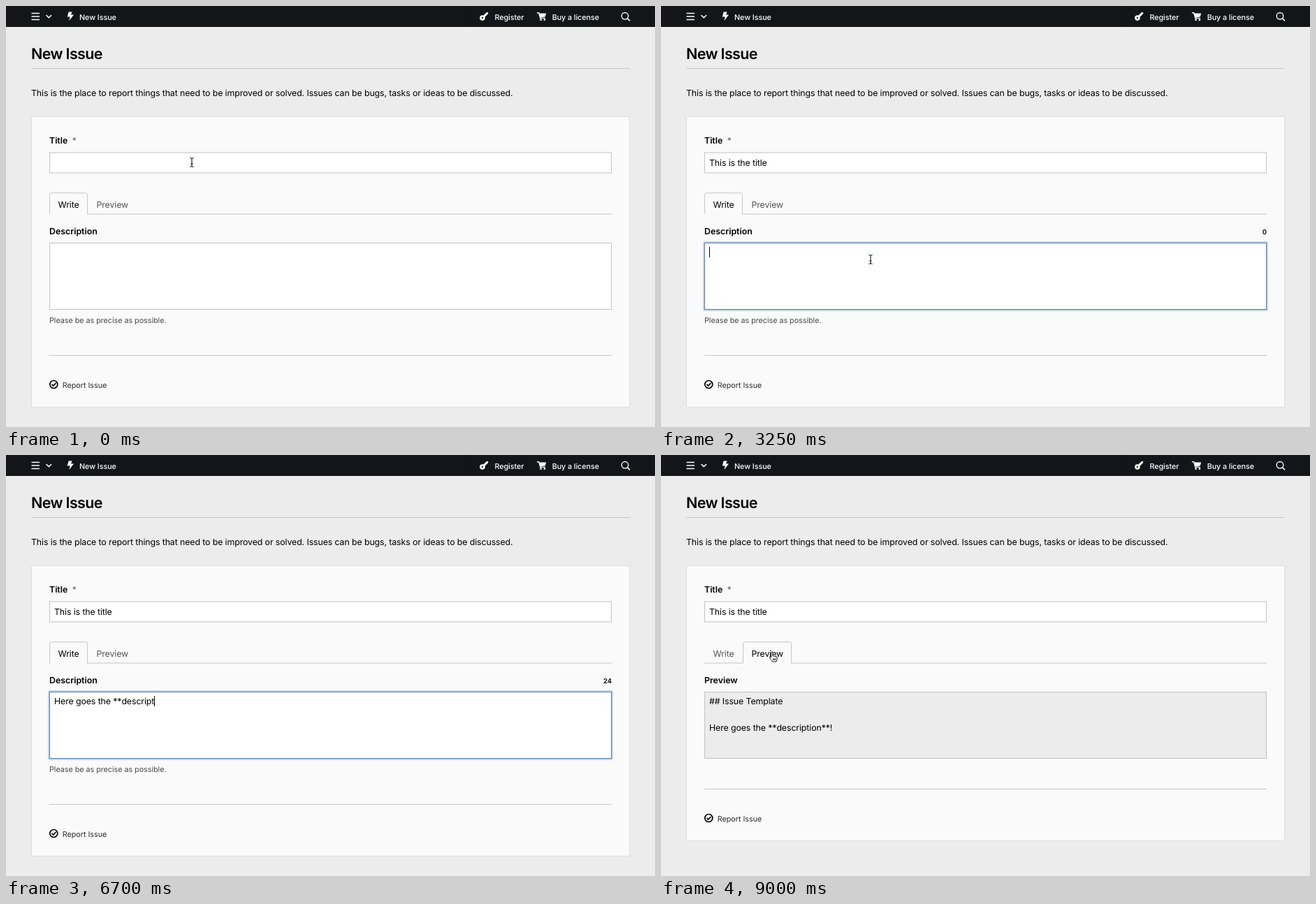
These frames come from a looping animation (929 px wide and 603 px high, 9.9 s). An HTML page:

```html
<!DOCTYPE html>
<html lang="en">
<head>
<meta charset="utf-8">
<title>New Issue</title>
<style>
html, body { margin: 0; width: 100%; height: 100%; overflow: hidden; background: #ececec; }
svg { display: block; width: 929px; height: 603px; }
text {
  font: 400 12.4px Inter, "Liberation Sans", sans-serif;
  letter-spacing: -.01em;
  white-space: pre;
  text-rendering: geometricPrecision;
  font-feature-settings: "calt" 0;
}
.label { font-weight: 600; letter-spacing: -.002em; }
.small { font-size: 10.8px; letter-spacing: -.004em; }
.nav { font-size: 10.8px; font-weight: 500; letter-spacing: -.008em; fill: #fff; }
.count { font-size: 9.5px; font-weight: 600; letter-spacing: 0; text-anchor: end; }
.head { font-size: 21.5px; font-weight: 600; letter-spacing: -.03em; }
.line { fill: none; stroke: #c6c6c6; }
.field { fill: #fff; stroke: #c2c2c2; }
.glow { fill: none; stroke: #5c86bd; stroke-opacity: .34; stroke-width: 3; }
.icon { fill: none; stroke: #fff; stroke-width: 1.6; stroke-linecap: round; stroke-linejoin: round; }
</style>
</head>
<body>
<svg viewBox="0 0 929 603">
  <rect width="929" height="603" fill="#ececec"/>
  <rect width="929" height="30" fill="#131519"/>
  <path d="M663.5 0V30" stroke="#0f1114"/>

  <g class="icon">
    <path d="M36.5 10.5H48M36.5 15H48M36.5 19.5H48" stroke-linecap="butt"/>
    <path d="M58 13.5L61.3 16.8L64.6 13.5"/>
    <circle cx="886" cy="14.3" r="4.8" stroke-width="1.4"/>
    <path d="M889.6 17.9L892.6 20.9" stroke-width="1.5"/>
    <circle cx="681.9" cy="17.1" r="2.5" stroke-width="2.6"/>
    <path d="M684.4 14.6L688.8 10.4" stroke-width="3"/>
    <path d="M760.5 9.8H762.8L764.8 17.4H771.4" stroke-width="1.4"/>
  </g>
  <g fill="#fff">
    <path d="M89.6 8.5H94.6L93 12.6H97L90.4 21.3L91.8 15.4H87.8Z"/>
    <path d="M763.4 10.6H773.2L771.8 15.6L764.8 16.4Z"/>
    <circle cx="765.6" cy="19.7" r="1.4"/>
    <circle cx="770.9" cy="19.7" r="1.4"/>
  </g>
  <text class="nav" x="105" y="19.5">New Issue</text>
  <text class="nav" x="699.5" y="19.5">Register</text>
  <text class="nav" x="781.7" y="19.5">Buy a license</text>

  <text class="head" x="36" y="76.3">New Issue</text>
  <path class="line" d="M36 89.5H893"/>
  <text x="36" y="129">This is the place to report things that need to be improved or solved. Issues can be bugs, tasks or ideas to be discussed.</text>

  <rect id="panel" x="36.5" y="158.5" width="856" height="416" fill="#fafafa" stroke="#dedede"/>

  <text class="label" x="62" y="197">Title</text>
  <text class="label" x="94.5" y="197" fill="#777">*</text>
  <text class="count" id="titleCount" x="867" y="197"></text>
  <rect class="glow" id="titleGlow" x="61.5" y="209" width="806" height="31" rx="1"/>
  <rect class="field" id="titleField" x="62.5" y="210" width="804" height="29"/>
  <text id="titleText" x="69" y="229"></text>
  <rect id="titleCaret" y="217" width="1" height="16"/>

  <path class="line" id="tabs"/>
  <text id="writeTab" x="74.5" y="289">Write</text>
  <text id="previewTab" x="129.5" y="289">Preview</text>

  <text class="label" id="bodyLabel" x="62" y="326.5"></text>
  <text class="count" id="bodyCount" x="867" y="327"></text>
  <rect class="glow" id="bodyGlow" x="61.5" y="338.5" width="806" height="97" rx="1"/>
  <rect class="field" id="bodyField" x="62.5" y="339.5" width="804" height="95"/>
  <text id="bodyHead" x="69" y="357">## Issue Template</text>
  <text id="bodyText" x="69"></text>
  <rect id="bodyCaret" y="345" width="1" height="15"/>
  <text class="small" id="hint" x="62" y="454" fill="#484848">Please be as precise as possible.</text>

  <g id="foot">
    <path class="line" d="M62 500.5H867"/>
    <g fill="none" stroke="#000" stroke-width="1.7">
      <circle cx="68.3" cy="542" r="5.5"/>
      <path d="M65.4 541.8L67.6 544L71.4 540.2"/>
    </g>
    <text class="small" x="80.8" y="546.5" fill="#2c2c2c">Report Issue</text>
  </g>

  <circle id="ring" cx="158.5" cy="282" fill="none" stroke="#000" stroke-width="2.4"/>
  <path id="beam" d="M-2.5-6.5Q0-6.5 0-5V5Q0 6.5-2.5 6.5M2.5-6.5Q0-6.5 0-5M0 5Q0 6.5 2.5 6.5M-1.5 2H1.5" fill="none" stroke="#000"/>
  <path id="arrow" d="M0 0V13.5L3.1 10.6L5.3 15.6L7.5 14.6L5.4 9.8H9.6Z" stroke="#fff" stroke-width=".9"/>
  <path id="hand" d="M0 8V1.3Q0 0 1.2 0T2.4 1.3V6Q3.6 5 4.6 6.3Q5.8 5.4 6.7 6.8Q8.6 6.4 8.6 8.2V10.5Q8.4 12 7.6 14H2.2Q1.5 12.5-.8 10.4Q-2.8 8-1.9 7.3Q-1 6.9 0 8ZM3.2 9.3V12M4.8 9.3V12M6.4 9.3V12" fill="#fff" stroke="#000" stroke-width=".9" stroke-linejoin="round"/>
</svg>
<script>
const LOOP = 9900, TICK = 50;
const TITLE_FOCUS = 250, BODY_FOCUS = 3250, BODY_BLUR = 8550, PREVIEW = 8650;
const $ = id => document.getElementById(id);

// Times of the key strokes, and the spans in which the caret is blinked off.
const title = {
  id: 'title', text: 'This is the title', from: TITLE_FOCUS, to: BODY_FOCUS,
  keys: [850, 1100, 1150, 1250, 1300, 1400, 1450, 1550, 1650, 1700, 1800, 1900, 2000, 2200, 2250, 2350, 2400],
  off: [[500, 850], [1000, 1100], [2550, 2700], [2850, 3050]]
};
const body = {
  id: 'body', text: 'Here goes the **description**!', from: BODY_FOCUS, to: BODY_BLUR,
  keys: [3650, 3750, 3800, 3900, 3950, 4350, 4600, 4650, 4750, 4850, 4950, 5000, 5100, 5300, 5500, 5550,
    5800, 5900, 5950, 6050, 6150, 6250, 6600, 6700, 6850, 6950, 7050, 7350, 7500, 7650],
  off: [[3500, 3650], [4100, 4300], [5650, 5800], [6400, 6600], [7200, 7350], [7800, 8050], [8200, 8350]]
};

// Pointer: time, x, y
const path = [
  [0, 266, 224], [2650, 266, 224], [2900, 296, 294], [3000, 296, 294],
  [3200, 300, 363], [8000, 300, 363], [8450, 158.5, 282], [LOOP, 158.5, 282]
];
const hidden = [[850, 2700], [3650, 8050]];

const within = (t, spans) => spans.some(([a, b]) => t >= a && t < b);
const show = (id, on) => $(id).setAttribute('visibility', on ? 'visible' : 'hidden');
const move = (id, x, y) => $(id).setAttribute('transform', `translate(${x} ${y})`);

function drawField(f, t) {
  const focus = t >= f.from && t < f.to;
  const n = f.keys.filter(k => k <= t).length;
  const text = $(f.id + 'Text');
  text.textContent = f.text.slice(0, n);
  $(f.id + 'Count').textContent = focus ? n : '';
  $(f.id + 'Field').style.stroke = focus ? '#587eb0' : '';
  show(f.id + 'Glow', focus);
  const caret = focus && !within(t, f.off);
  show(f.id + 'Caret', caret);
  if (caret) {
    const end = n ? text.getComputedTextLength() : 0;
    $(f.id + 'Caret').setAttribute('x', Math.round(69 + end));
  }
}

function drawTabs(preview) {
  const [a, b] = preview ? [117.5, 186.5] : [62.5, 116.5];
  $('tabs').setAttribute('d',
    `M62 298H${a}V270.8q0 -3 3 -3H${b - 3}q3 0 3 3V298H867`);
  $('writeTab').setAttribute('fill', preview ? '#555' : '#000');
  $('previewTab').setAttribute('fill', preview ? '#000' : '#555');
  $('bodyLabel').textContent = preview ? 'Preview' : 'Description';
  $('bodyField').style.fill = preview ? '#ececec' : '';
  $('bodyText').setAttribute('y', preview ? 395 : 357);
  show('bodyHead', preview);
  show('hint', !preview);
  $('panel').setAttribute('height', preview ? 394 : 416);
  move('foot', 0, preview ? -22 : 0);
}

function pointerAt(t) {
  const i = path.findIndex(p => p[0] > t);
  const [t0, x0, y0] = path[i - 1], [t1, x1, y1] = path[i];
  const u = (t - t0) / (t1 - t0), e = u * u * (3 - 2 * u);
  return [x0 + (x1 - x0) * e, y0 + (y1 - y0) * e];
}

function drawPointer(t) {
  const [x, y] = pointerAt(t);
  const inField = y > 209 && y < 240 || y > 339 && y < 435;
  const onTab = x > 117 && x < 187 && y > 267 && y < 298;
  const kind = inField ? 'beam' : onTab ? 'hand' : 'arrow';
  const seen = !within(t, hidden);
  for (const id of ['beam', 'arrow', 'hand']) show(id, seen && id === kind);
  move(kind, kind === 'hand' ? x - 1 : x, y);

  show('ring', t >= 8500 && t < PREVIEW);
  $('ring').setAttribute('r', Math.max(0, 9 + (t - 8500) * .14));
}

function draw(t) {
  drawTabs(t >= PREVIEW);
  drawField(title, t);
  drawField(body, t);
  drawPointer(t);
}

const start = performance.now();
function frame() {
  const t = (performance.now() - start) % LOOP;
  draw(Math.floor(t / TICK) * TICK);
  requestAnimationFrame(frame);
}
frame();
</script>
</body>
</html>
```
